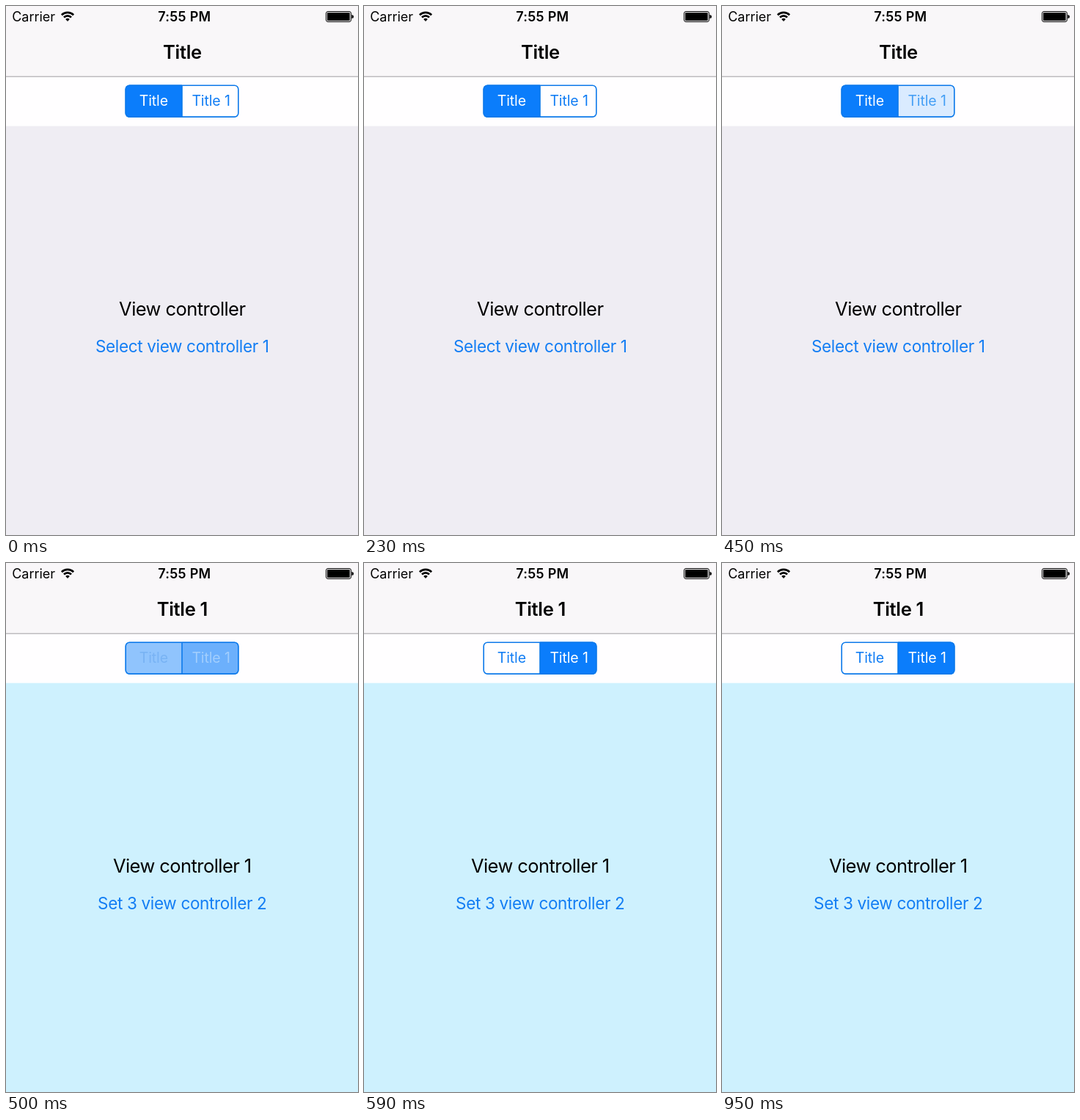
Recreate the animation shown at these times as an HTML page. Size 480 px wide and 721 px high, loop 990 ms.

```html
<!DOCTYPE html>
<html lang="en">
<head>
<meta charset="utf-8">
<title>Segmented control</title>
<style>
  :root { --tint: #0b7dfb; --line: #0c79ea; --loop: 990ms; }
  html, body { margin: 0; width: 100%; height: 100%; overflow: hidden; background: #fff; }
  svg { display: block; width: 480px; height: 721px; }
  text {
    font-family: Inter, Roboto, sans-serif;
    font-optical-sizing: none;
    font-size: 25.5px;
    letter-spacing: -.022em;
    text-anchor: middle;
  }
  .bold { font-weight: 600; letter-spacing: -.012em; }
  .status { font-size: 18px; letter-spacing: 0; }
  .clock { letter-spacing: .016em; }
  .seg { font-size: 19.5px; letter-spacing: -.006em; }
  .link { font-size: 22.5px; letter-spacing: -.015em; fill: #127df4; }

  .first, .second, .left, .right, .leftText, .rightText {
    animation: var(--loop) step-end infinite;
  }
  .first { animation-name: first; }
  .second { animation-name: second; }
  .left { animation-name: left; }
  .right { animation-name: right; }
  .leftText { animation-name: leftText; }
  .rightText { animation-name: rightText; }

  /* hard page swap */
  @keyframes first { 0% { visibility: visible } 50.5%, 100% { visibility: hidden } }
  @keyframes second { 0% { visibility: hidden } 50.5%, 100% { visibility: visible } }

  /* press highlight, then the selection fades across */
  @keyframes left {
    0% { fill-opacity: 1 }
    50.5% { fill-opacity: .45 }
    55.5% { fill-opacity: .08 }
    59.5%, 100% { fill-opacity: 0 }
  }
  @keyframes right {
    0% { fill-opacity: 0 }
    45.4% { fill-opacity: .15 }
    50.5% { fill-opacity: .6 }
    55.5% { fill-opacity: .95 }
    59.5%, 100% { fill-opacity: 1 }
  }
  @keyframes leftText {
    0% { fill: #fff }
    50.5% { fill: #78b3f4 }
    55.5% { fill: #2089f8 }
    59.5%, 100% { fill: #127df4 }
  }
  @keyframes rightText {
    0% { fill: #127df4 }
    45.4% { fill: #459ff5 }
    50.5% { fill: #a2cefd }
    55.5% { fill: #f2f8ff }
    59.5%, 100% { fill: #fff }
  }
</style>
</head>
<body>
<svg viewBox="0 0 480 721">
  <defs>
    <clipPath id="pill"><rect x="162.5" y="107.5" width="155" height="44.5" rx="6"/></clipPath>
  </defs>

  <rect width="480" height="721" fill="#fffeff"/>
  <rect width="480" height="96" fill="#f9f7f9"/>
  <rect y="95.6" width="480" height="1.2" fill="#aeacb0"/>

  <!-- status bar -->
  <text class="status" x="8.2" y="21" style="text-anchor:start">Carrier</text>
  <g fill="none" stroke="#000" stroke-width="2.7">
    <path d="M75.9 12.3a11.4 11.4 0 0 1 16.2 0"/>
    <path d="M79 15.5a7 7 0 0 1 10 0"/>
    <path d="M84 21l-2.8-2.9a4 4 0 0 1 5.6 0z" fill="#000" stroke="none"/>
  </g>
  <text class="bold status clock" x="243.3" y="21">7:55 PM</text>
  <rect x="436.5" y="7.5" width="34" height="14" rx="2.5" fill="none" stroke="#000"/>
  <rect x="438" y="9" width="30.8" height="11" rx="1" fill="#000"/>
  <path d="M471.5 12a2.5 2.5 0 0 1 0 5z"/>

  <g class="first">
    <text class="bold" x="240.4" y="71.5">Title</text>
    <rect y="163.6" width="480" height="558" fill="#efedf3"/>
    <text x="240.3" y="422.4">View controller</text>
    <text class="link" x="240.3" y="472.2">Select view controller 1</text>
  </g>
  <g class="second">
    <text class="bold" x="240.4" y="71.5">Title 1</text>
    <rect y="163.6" width="480" height="558" fill="#cef1fe"/>
    <text x="240.3" y="422.4">View controller 1</text>
    <text class="link" x="240.3" y="472.2">Set 3 view controller 2</text>
  </g>

  <!-- segmented control -->
  <g clip-path="url(#pill)" fill="var(--tint)">
    <rect class="left" x="162" y="107" width="78" height="45"/>
    <rect class="right" x="240" y="107" width="78" height="45"/>
  </g>
  <g fill="none" stroke="var(--line)" stroke-width="1.6">
    <rect x="163.2" y="108.2" width="153.6" height="42.9" rx="5.2"/>
    <path d="M240 108v43"/>
  </g>
  <text class="seg leftText" x="201.3" y="136.4">Title</text>
  <text class="seg rightText" x="279.6" y="136.4">Title 1</text>
</svg>
</body>
</html>
```
